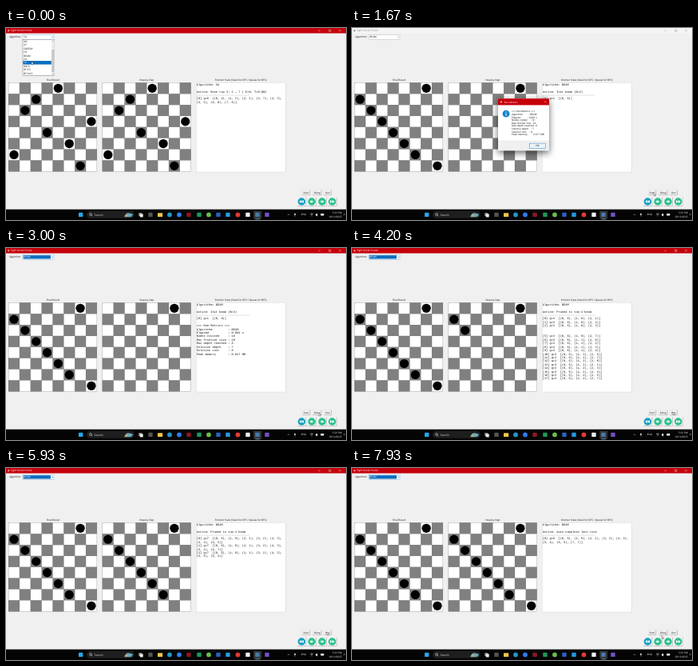
Write an HTML page that moves like this. It is 426 px wide and 240 px high and loops after 8 s.

```html
<!DOCTYPE html>
<html lang="en">
<head>
<meta charset="utf-8">
<title>Eight Rooks Puzzle</title>
<style>
  html, body { margin: 0; width: 100%; height: 100%; overflow: hidden; background: #f0f0f0; }
  svg { display: block; width: 100vw; height: 100vh; }
  text { font: 3.1px "Open Sans", sans-serif; white-space: pre; text-rendering: geometricPrecision; }
  .mono { font: 3.67px "Liberation Mono", monospace; }
  .dialog { filter: drop-shadow(0 3px 4px #0009); }
</style>
</head>
<body>
<svg viewBox="0 0 426 240">
  <g id="window"></g>
  <g id="taskbar"></g>
  <g id="overlay"></g>
</svg>
<script>
const LOOP = 8000;
const PICK = 470, START = 1400, CLOSE = 2300, RUN = 3550, STEP = 200, REPAINT_LAG = 80;
const RED = '#c5000b', BLUE = '#0a6cbe';
const CELL = 13.85, BOARD_Y = 68.4;
const LINE = 4.41;
const SA = [4, 2, 1, 7, 3, 5, 0, 6];
const BEAM = [6, 0, 1, 2, 3, 4, 5, 7];
const ITEMS = ['IDS', 'A*', 'GREEDY', 'HC', 'BEAM', 'GA', 'SA', 'BKTR', 'BT+FC', 'BT+AC3'];
const METRICS = [
  ['Algorithm', 'BEAM'], ['Elapsed', '0.001 s'], ['Nodes visited', '18'],
  ['Max frontier size', '18'], ['Max depth reached', '8'], ['Solution depth', '7'],
  ['Solution cost', '8'], ['Peak memory', '0.017 MB']
];
// time, x, y of the pointer
const POINTER = [
  [0, 32, 42], [120, 32, 42], [350, 30, 34], [520, 30, 34], [1200, 378, 206], [1750, 378, 206],
  [2200, 232, 147], [2350, 232, 147], [2850, 392, 206], [3100, 392, 206], [3450, 402, 205],
  [5950, 402, 205], [6500, 411, 210], [7300, 411, 210], [7800, 388, 209.5], [LOOP, 388, 209.5]
];

const rect = (x, y, w, h, fill, extra = '') =>
  `<rect x="${x}" y="${y}" width="${w}" height="${h}" fill="${fill}" ${extra}/>`;
const circle = (x, y, r, fill, extra = '') =>
  `<circle cx="${x}" cy="${y}" r="${r}" fill="${fill}" ${extra}/>`;
const path = (d, fill, stroke = 'none', width = .4) =>
  `<path d="${d}" fill="${fill}" stroke="${stroke}" stroke-width="${width}"/>`;
const text = (x, y, str, fill = '#111', extra = '') =>
  `<text x="${x}" y="${y}" fill="${fill}" ${extra}>${str}</text>`;
const outline = (color, width = .3) => `stroke="${color}" stroke-width="${width}"`;
const MIDDLE = 'text-anchor="middle"';
const cross = (x, y, r, color) =>
  path(`M${x - r} ${y - r}l${2 * r} ${2 * r}m0 ${-2 * r}l${-2 * r} ${2 * r}`, 'none', color);

// ---- Beam search steps ----
const expand = beams => beams.flatMap(b =>
  [...Array(8).keys()].filter(c => !b.includes(c)).map(c => [...b, c]));

function entry(cols, i) {
  const pairs = cols.map((c, r) => `(${r}, ${c})`);
  const head = `[${i}] g=${cols.length}  [` + pairs.slice(0, 5).join(', ');
  return cols.length > 5 ? [head + ',', pairs.slice(5).join(', ') + ']'] : [head + ']'];
}

const report = (name, action, states) => [
  'Algorithm: ' + name, '', 'Action: ' + action, '-'.repeat(30), ...states.flatMap(entry)
];

function buildSteps() {
  let beams = [[BEAM[0]]];
  const steps = [{ rooks: beams[0], lines: report('BEAM', 'Init beam (B=3)', beams) }];
  while (beams[0].length < 7) {
    const children = expand(beams);
    steps.push({
      rooks: beams[beams.length - 1],
      lines: report('BEAM', `Generated ${children.length} children`, children)
    });
    beams = children.slice(0, 3);
    steps.push({ rooks: beams[0], pruned: true, lines: report('BEAM', 'Pruned to top-3 beam', beams) });
  }
  steps.push({ rooks: BEAM, lines: report('BEAM', 'Auto-complete last rook', [BEAM]) });
  return steps;
}

const steps = buildSteps();
const saLines = report('SA', 'Move row 3: 1 → 7 | E=0, T=0.002', [SA]);
const metricRows = ['=== Run Metrics ===',
  ...METRICS.map(([name, value]) => name.padEnd(18) + ': ' + value)];

function solverState(t) {
  if (t < START) return { final: SA, rooks: SA, lines: saLines };
  const index = t < RUN ? 0 : Math.min(steps.length - 1, 1 + Math.floor((t - RUN) / STEP));
  const { rooks, pruned } = steps[index];
  let { lines } = steps[index];
  if (index === 0 && t >= CLOSE) lines = [...lines, '', ...metricRows];
  // The lower part of the list repaints slightly later than the upper part.
  if (pruned && (t - RUN) % STEP < REPAINT_LAG) {
    lines = [...lines, '', '', ...steps[index - 1].lines.slice(9)];
  }
  return { final: BEAM, rooks, lines };
}

// ---- Window parts ----
function board(x, rooks) {
  let out = rect(x, BOARD_Y, CELL * 8, CELL * 8, '#fff', outline('#777'));
  for (let r = 0; r < 8; r++) {
    for (let c = 0; c < 8; c++) {
      if ((r + c) % 2) out += rect(x + c * CELL, BOARD_Y + r * CELL, CELL, CELL, '#808080', outline('#555', .2));
    }
  }
  return out + rooks.map((c, r) =>
    circle(x + (c + .5) * CELL, BOARD_Y + (r + .5) * CELL, 5.65, '#000')).join('');
}

function titleBar(inactive) {
  const ink = inactive ? '#888' : '#fff';
  return rect(0, 0, 426, 6.6, inactive ? '#f5f5f5' : RED) +
    circle(3.2, 3.3, 1.1, inactive ? '#777' : '#e9b5b8') +
    text(6, 4.4, 'Eight Rooks Puzzle', ink) +
    path('M391.5 3.5h2.4M404.7 2.2h2.2v2.2h-2.2z', 'none', ink) + cross(418.6, 3.3, 1.1, ink);
}

function combo(t) {
  const picked = t >= PICK;
  const selected = picked && !(t >= START && t < CLOSE);
  return text(4, 12.3, 'Algorithm:') +
    rect(21, 8.6, 39.8, 5.6, '#fff', outline(selected || !picked ? '#4a8fc7' : '#999')) +
    (selected ? rect(21.7, 9.2, 34.2, 4.3, BLUE) : '') +
    text(22.2, 12.3, picked ? 'BEAM' : 'SA', selected ? '#fff' : '#111') +
    rect(56.5, 8.9, 4, 5, selected || !picked ? '#e5f1fa' : '#f5f5f5') +
    path('M57.6 10.9l1 1 1-1', 'none', '#444');
}

function dropdown(pointerY) {
  const top = 14.4, pitch = 4.45;
  const hovered = Math.floor((pointerY + .6 - top) / pitch);
  return rect(21, top, 39.8, pitch * 10 + .3, '#fff', outline('#555', .4)) +
    ITEMS.map((name, i) => {
      const y = top + i * pitch;
      return (i === hovered ? rect(21.3, y, 35.5, pitch, BLUE) : '') +
        text(22.2, y + 3.3, name, i === hovered ? '#fff' : '#111');
    }).join('') +
    rect(57, top + .2, 3.6, pitch * 10, '#eee') + rect(57.2, 27, 3.2, 28, '#c6c6c6') +
    path('M57.9 17l.9-1 .9 1M57.9 57l.9 1 .9-1', 'none', '#555');
}

const button = (x, w, label) =>
  rect(x, 202.4, w, 6.2, '#f2f2f2') +
  path(`M${x} 208.6h${w}v-6.2`, 'none', '#777') + path(`M${x} 208.6v-6.2h${w}`, 'none', '#ddd') +
  text(x + w / 2, 206.6, label, '#111', MIDDLE);

function roundButton(x, fill, dir, double) {
  const arrow = dx => {
    const tip = x + dx + dir * 1.7, base = x + dx - dir * 1.1;
    return path(`M${tip} 217L${base} 214.9V219.1z`, '#fff');
  };
  return rect(x - 5.5, 211.5, 11, 11, '#f2f2f2') +
    path(`M${x - 5.5} 222.5h11v-11`, 'none', '#888') + circle(x, 217, 4.75, fill) +
    (double ? arrow(-1.4) + arrow(1.4) : arrow(dir * .7) + rect(x - 2.4, 216.5, 4.4, 1, '#fff'));
}

function dialog() {
  return '<g class="dialog">' + rect(183, 88.2, 64, 65, '#fff') + '</g>' +
    rect(183, 88.2, 64, 8.2, RED) + circle(187, 92.4, 1.1, '#e9b5b8') +
    text(190.7, 93.5, 'Run Metrics', '#fff') + cross(242.3, 92.4, 1, '#fff') +
    circle(193, 107.2, 4.4, '#1583cc') + rect(192.5, 106.5, 1, 3.2, '#fff') + circle(193, 104.9, .65, '#fff') +
    metricRows.map((row, i) => text(200, 105.4 + i * 3.6, row)).join('') +
    rect(183, 140.6, 64, 12.6, '#f0f0f0') +
    rect(222.6, 144.1, 19.6, 6.2, '#eaf3fa', outline(BLUE, .4)) +
    text(232.4, 148.3, 'OK', '#111', MIDDLE);
}

function drawWindow(t) {
  const { final, rooks, lines } = solverState(t);
  return rect(0, 0, 426, 228, '#f0f0f0') + titleBar(t >= START && t < CLOSE) + combo(t) +
    text(59, 66.2, 'Final Result', '#111', MIDDLE) +
    text(176.3, 66.2, 'Step-by-Step', '#111', MIDDLE) +
    text(294, 66.2, 'Frontier State (Stack for DFS / Queue for BFS)', '#111', MIDDLE) +
    board(3.1, final) + board(120.9, rooks) +
    rect(238.2, 68.3, 112, 111.7, '#fff', outline('#c4c4c4')) +
    lines.map((line, i) => text(238.7, 71.8 + i * LINE, line, '#111', 'class="mono"')).join('') +
    button(371.2, 9.6, 'Start') + button(384.3, 10.8, 'Dừng') + button(398.4, 9.2, 'Run') +
    roundButton(370.4, '#18a0c0', -1, true) + roundButton(383.1, '#2cc08c', -1) +
    roundButton(396, '#2cc08c', 1) + roundButton(408.7, '#2cc08c', 1, true);
}

function drawTaskbar() {
  const square = (x, fill) => rect(x - 2.7, 230.7, 5.4, 5.4, fill, 'rx=".7"');
  const round = (x, fill) => circle(x, 233.4, 2.9, fill);
  const small = (x, y, str, extra) => text(x, y, str, '#fff', extra);
  return rect(0, 226.7, 426, 13.3, '#040404') +
    square(93.7, '#25a8ee') +
    rect(101, 229, 60, 8.8, '#1e1e1e', 'rx="4.4"') +
    circle(106, 233, 1.4, 'none', outline('#fff', .5)) + path('M107 234l1.3 1.3', 'none', '#fff', .5) +
    text(110.5, 234.7, 'Search', '#ddd', 'style="font-size:3.6px"') +
    path('M148 236.2q2-5 5-5t6 1.5q-1 3.5-4 3.5z', '#6fa9b8') + circle(151, 234.6, 1.2, '#d8b36a') +
    rect(166.2, 231, 4, 4, '#888') + rect(167.7, 232.4, 4, 4, '#eee') +
    square(181, '#555') + rect(190, 231.2, 6.2, 4.8, '#f4c64b', 'rx=".5"') +
    round(205, '#2196c9') + round(217, '#2f7df0') + square(229, '#8d1722') +
    square(242, '#1f9a57') + round(254, '#69bd48') + square(266, '#2864c2') +
    square(278, '#259bdf') + round(290.5, '#e33b37') + square(303, '#eee') +
    rect(310.2, 228.4, 10, 10, '#333', 'rx="1"') + square(315, '#4679ac') + square(327, '#7350c7') +
    rect(312.3, 238.5, 6, .7, '#7cc5ee') +
    path('M352.7 234l1.3-1.3 1.3 1.3', 'none', '#fff') +
    rect(361.3, 231.4, 1.4, 2.8, '#fff', 'rx=".7"') + path('M362 234.4v1.4', 'none', '#fff') +
    small(373, 234.3, 'ENG', MIDDLE) +
    path('M381 232.6q2-1.8 4 0M381.9 233.8q1.1-1 2.2 0', 'none', '#fff', .5) + circle(383, 235, .4, '#fff') +
    path('M388 232.5h1l1.2-1v4l-1.2-1h-1z', '#fff') +
    rect(394.3, 232, 4, 2.4, '#fff', 'rx=".4"') +
    small(420.7, 232.2, '5:01 PM', 'text-anchor="end"') +
    small(420.7, 236.7, '10/12/2025', 'text-anchor="end"') +
    circle(423.7, 233, .8, 'none', outline('#fff'));
}

function pointerAt(t) {
  const i = POINTER.findIndex(p => p[0] > t);
  const [t0, x0, y0] = POINTER[i - 1], [t1, x1, y1] = POINTER[i];
  const u = (t - t0) / (t1 - t0), k = u * u * (3 - 2 * u);
  return [x0 + (x1 - x0) * k, y0 + (y1 - y0) * k];
}

function drawOverlay(t) {
  const [x, y] = pointerAt(t);
  return (t < PICK ? dropdown(y) : '') + (t >= START && t < CLOSE ? dialog() : '') +
    path(`M${x} ${y}v3.7l.9-.8.6 1.4.7-.3-.6-1.3h1.2z`, '#fff', '#000', .3);
}

const layer = id => document.getElementById(id);
layer('taskbar').innerHTML = drawTaskbar();

function frame() {
  const t = performance.now() % LOOP;
  layer('window').innerHTML = drawWindow(t);
  layer('overlay').innerHTML = drawOverlay(t);
  requestAnimationFrame(frame);
}
frame();
</script>
</body>
</html>
```
